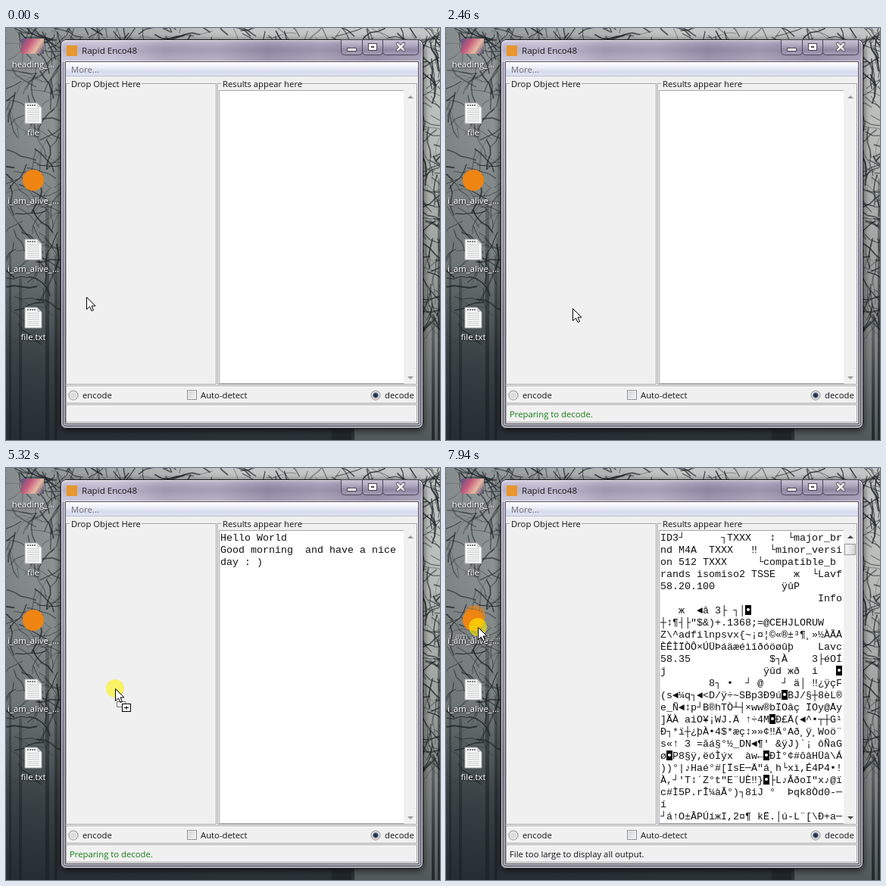
An HTML page with a canvas for the animation above (8000 ms loop, 573 by 544 pixels).

```html
<!DOCTYPE html>
<html lang="en">
<head>
<meta charset="utf-8">
<title>Decoder demo</title>
<style>
html, body { margin: 0; height: 100%; overflow: hidden; background: #555; }
canvas { display: block; }
</style>
</head>
<body>
<canvas id="stage" width="573" height="544"></canvas>
<script>
const W = 573, H = 544, LOOP = 8000;
const UI = '"Open Sans", "Noto Sans", sans-serif';
const MONO = '13.33px "Liberation Mono", "DejaVu Sans Mono", monospace';
const view = document.getElementById('stage').getContext('2d');
const backdrop = document.createElement('canvas');
backdrop.width = W;
backdrop.height = H;
let g = backdrop.getContext('2d');

let seed = 11;
const rnd = () => (seed = seed * 16807 % 2147483647) / 2147483647;

function fill(x, y, w, h, color) {
  g.fillStyle = color;
  g.fillRect(x, y, w, h);
}
function frame(x, y, w, h, color) {
  g.strokeStyle = color;
  g.lineWidth = 1;
  g.strokeRect(x + .5, y + .5, w - 1, h - 1);
}
function etch(x, y, w, h) {
  frame(x + 1, y + 1, w, h, '#fff');
  frame(x, y, w, h, '#a0a0a0');
}
function shade(x0, y0, x1, y1, ...colors) {
  const s = g.createLinearGradient(x0, y0, x1, y1);
  colors.forEach((c, i) => s.addColorStop(i / (colors.length - 1), c));
  return s;
}
function text(s, x, y, color = '#111', size = 11.3) {
  g.font = `${size}px ${UI}`;
  g.fillStyle = color;
  g.fillText(s, x, y);
}
function disc(x, y, r, color) {
  g.fillStyle = color;
  g.beginPath();
  g.arc(x, y, r, 0, 7);
  g.fill();
}
function poly(points, color, line) {
  g.beginPath();
  points.forEach(([x, y]) => g.lineTo(x, y));
  g.closePath();
  g.fillStyle = color;
  g.fill();
  if (line) {
    g.strokeStyle = line;
    g.lineWidth = 1;
    g.stroke();
  }
}

function forest() {
  fill(0, 0, W, H, shade(0, 0, 0, H, '#c3c7c5', '#b9bdba', '#a4a8a5', '#838886', '#50585a'));
  fill(0, 0, 300, H, shade(0, 0, 300, 0, 'rgba(35,45,52,.38)', 'rgba(35,45,52,0)'));
  fill(0, 310, 460, 234, shade(0, 310, 0, H, 'rgba(38,46,52,0)', 'rgba(38,46,52,.6)', 'rgba(34,41,46,.85)'));
  g.lineCap = 'round';
  for (let i = 0; i < 420; i++) {
    let x = i % 3 ? (i % 3 == 1 ? rnd() * 80 : 545 + rnd() * 30) : rnd() * W;
    let y = i % 3 ? rnd() * 400 : rnd() * 30, a = rnd() * 7;
    g.strokeStyle = `rgba(28,34,38,${.35 + rnd() * .45})`;
    g.lineWidth = .5 + rnd() * 1.5;
    g.beginPath();
    g.moveTo(x, y);
    for (let k = 0; k < 4; k++) {
      a += rnd() - .5;
      x += Math.cos(a) * 10;
      y += Math.sin(a) * 10;
      g.lineTo(x, y);
    }
    g.stroke();
  }
  for (const [x, w, top] of [[4, 3, 300], [17, 4, 330], [52, 5, 230], [64, 4, 300], [430, 26, 520], [562, 4, 380], [570, 5, 200]])
    fill(x, top, w, H - top, shade(0, top, 0, H, 'rgba(32,38,42,.3)', 'rgba(30,35,39,.9)'));
}

function captionButtons() {
  for (const [x, w] of [[442, 29], [470, 28], [497, 48]]) {
    g.beginPath();
    g.roundRect(x + .5, 15.5, w - 1, 20, [0, 0, 4, 4]);
    g.fillStyle = shade(0, 15, 0, 36, '#cbc6d6', '#b3adc2', '#8f88a2', '#a9a2ba');
    g.fill();
    g.strokeStyle = '#4b475a';
    g.lineWidth = 1;
    g.stroke();
  }
  fill(450, 26, 13, 5, '#484552');
  fill(451, 27, 11, 3, '#fff');
  fill(478, 20, 12, 10, '#484552');
  fill(479, 21, 10, 8, '#fff');
  fill(482, 24, 4, 2, '#484552');
  for (const [color, width] of [['#484552', 4.5], ['#fff', 2.5]]) {
    g.strokeStyle = color;
    g.lineWidth = width;
    g.beginPath();
    g.moveTo(517, 21);
    g.lineTo(525, 29);
    g.moveTo(525, 21);
    g.lineTo(517, 29);
    g.stroke();
  }
}

function groupBox(x, w, title, titleWidth) {
  etch(x, 73, w, 398);
  fill(x + 5, 72, titleWidth, 4, '#f0f0f0');
  text(title, x + 7, 78);
}

function radio(x, on) {
  disc(x, 485, 6.5, '#8e8f8f');
  disc(x, 485, 5.5, '#f4f4f4');
  disc(x, 485, 4.3, on ? '#8a97a6' : '#dcdcdc');
  if (on) disc(x, 485, 2.8, '#1d3044');
}

function appWindow() {
  g.save();
  g.shadowColor = 'rgba(0,0,0,.75)';
  g.shadowBlur = 10;
  g.shadowOffsetY = 2;
  g.beginPath();
  g.roundRect(72, 15, 479, 514, 7);
  g.fillStyle = shade(0, 15, 0, 529, '#a8a0b9', '#a19bb0', '#928ca2', '#767385', '#83828f');
  g.fill();
  g.restore();
  g.save();
  g.clip();
  fill(72, 15, 479, 30, shade(72, 0, 551, 0, '#c8c4d8', '#cbc7da', '#aaa3ba', '#b3abc2', '#978ea9', '#a89fb8', '#9188a3', '#a79eb7'));
  fill(72, 15, 479, 30, shade(0, 15, 0, 45, 'rgba(255,255,255,.3)', 'rgba(80,65,105,.12)', 'rgba(255,255,255,.1)'));
  g.restore();
  for (const [inset, color] of [[.5, '#1d1c22'], [1.5, 'rgba(255,255,255,.65)']]) {
    g.beginPath();
    g.roundRect(72 + inset, 15 + inset, 479 - 2 * inset, 514 - 2 * inset, 6.5);
    g.strokeStyle = color;
    g.lineWidth = 1;
    g.stroke();
  }
  fill(80, 23, 14, 14, '#e8962e');
  text('Rapid Enco48', 100, 34, '#1a1a1a', 11.6);
  captionButtons();

  frame(77, 43, 469, 481, 'rgba(255,255,255,.5)');
  frame(78, 44, 467, 479, '#55525f');
  fill(79, 45, 465, 477, '#f0f0f0');
  fill(79, 45, 465, 19, shade(0, 45, 0, 64, '#fff', '#eef1f9', '#d6dcee', '#dfe4f3'));
  fill(79, 63, 465, 1, '#b9bfd3');
  text('More...', 86, 59, '#6d6d6d');
  groupBox(79, 199, 'Drop Object Here', 95);
  groupBox(279, 264, 'Results appear here', 105);
  fill(281, 82, 245, 388, '#fff');
  frame(281, 82, 245, 388, '#a3a6ac');
  fill(525, 82, 17, 388, '#f0f0f0');
  etch(79, 472, 464, 24);
  etch(79, 497, 464, 24);
  radio(89, false);
  radio(488, true);
  text('encode', 101, 489);
  text('Auto-detect', 257, 489);
  text('decode', 500, 489);
  fill(239, 478, 13, 13, '#f4f4f4');
  fill(241, 480, 9, 9, shade(241, 480, 250, 489, '#cfd2d6', '#f4f4f4'));
  frame(239, 478, 13, 13, '#8e8f8f');
}

const icons = [
  ['thumb', 'heading_...', 22], ['page', 'file', 112], ['ball', 'i_am_alive_...', 202],
  ['page', 'i_am_alive_...', 292], ['page', 'file.txt', 382]
];
function drawIcon([kind, label, y]) {
  if (kind == 'thumb') {
    fill(20, 14, 30, 20, shade(20, 14, 50, 34, '#54557f', '#c4587c', '#e7b8a3', '#3f426c'));
  } else if (kind == 'ball') {
    disc(36, y - 1, 14, '#ee8512');
  } else {
    poly([[25, y - 13], [41, y - 13], [47, y - 7], [47, y + 14], [25, y + 14]], '#fafafa', '#aaa');
    poly([[41, y - 13], [41, y - 7], [47, y - 7]], '#ccd0d2');
    for (let k = 0; k < 7; k++) fill(28, y - 6 + k * 2.7, 16, 1, '#c2c5c6');
    for (let k = 0; k < 4; k++) fill(28 + k * 3, y - 11, 2, 2, '#777');
  }
  g.save();
  g.textAlign = 'center';
  g.shadowColor = '#000';
  g.shadowBlur = 3;
  g.shadowOffsetX = g.shadowOffsetY = 1;
  text(label, 36, y + 30, '#fff');
  g.restore();
}

const greeting = ['Hello World', 'Good morning  and have a nice', 'day : )'];
const binary = String.raw`ID3┘      ┐TXXX   ↕  └major_br
nd M4A  TXXX   ‼  └minor_versi
on 512 TXXX     └compatible_b
rands isomiso2 TSSE   ж  └Lavf
58.20.100           ÿûP
                          Info
   ж  ◄â 3├ ┐│◘
┼↕¶┤├"$&)+.1368;=@CEHJLORUW
Z\^adfilnpsvx{~¡¤¦©«®±³¶¸»½ÀÃÅ
ÈÊÌÏÒÔ×ÚÜÞáäæéìîðóöøûþ    Lavc
58.35             $┐À    3├éOÍ
j                ÿûd жð  i   ◘
        8┐ •  ┘ @   ┘ ä│ ‼¿ÿçF
(s◄¼q┐◄<D/ÿ÷~SBp3Ð9ú◘BJ/§┼8èL®
e_Ñ◄↕p┘B®hTÒ┴┤×ww®bÏOâç ÏOy@Åy
]ÃÀ aiO¥¡WJ.Ä ↑÷4M◘Ð£Ä(◄^•┬┼G¹
Ð┐*ï┼¿þÀ•4$*æç↕»»¢‼Ä°Að¸ÿ¸Woö¨
s«↑ 3 =ãá§°½_DN◄¶' &ÿJ)` + '`' + String.raw`¡ ôÑaG
ø◘P8§ÿ,ëóÌýx  àw←◘ÐÌ°¢#õâHÜâ\Á
))°|♪Haé°#[ÏsE─Ä"á¸h└xì,É4P4•!
À,┘'T↕´Z°t"E¨UÈ‼}◘├L♪ÂðoI"x♪@ï
c#Ì5P.rÎ¼àÂ°)┐8iJ °  Þqk8Òd0-─
í
┘á↑O±ÂPÚíжI,2¤¶ kË.│ú-L¨[\Ð+a─`;
const dump = binary.split('\n');

function results(lines) {
  g.save();
  g.beginPath();
  g.rect(282, 83, 243, 386);
  g.clip();
  g.font = MONO;
  g.fillStyle = '#111';
  lines.forEach((line, row) => [...line].forEach((ch, col) => {
    const x = 283 + col * 8, y = 96 + row * 16;
    if (ch == '◘') {
      fill(x, y - 11, 8, 13, '#000');
      disc(x + 4, y - 5, 2, '#fff');
      g.fillStyle = '#111';
    } else g.fillText(ch, x, y);
  }));
  g.restore();
}

function scrollbar(active) {
  const color = active ? '#444' : '#9a9a9a';
  poly([[530, 93], [538, 93], [534, 89]], color);
  poly([[530, 460], [538, 460], [534, 464]], color);
  if (!active) return;
  fill(527, 101, 14, 14, shade(527, 0, 541, 0, '#f6f6f6', '#e6e6e6', '#cfcfcf'));
  frame(526, 100, 15, 15, '#979797');
}

// Pointer moves: start, end, number of steps, then the points passed
const moves = [
  [230, 850, 9, [106, 355], [25, 384]],
  [1390, 2000, 9, [25, 384], [82, 359], [158, 363]],
  [2130, 2230, 2, [158, 363], [167, 370]],
  [3390, 4150, 10, [167, 370], [32, 298]],
  [4380, 4480, 2, [32, 298], [31, 290]],
  [4560, 5090, 8, [31, 290], [58, 272], [112, 277]],
  [5190, 5320, 3, [112, 277], [144, 291]],
  [5400, 5650, 4, [144, 291], [151, 299]],
  [6350, 6580, 3, [151, 299], [131, 277]],
  [6650, 7130, 8, [131, 277], [22, 212]],
  [7200, 7340, 3, [22, 212], [46, 224], [40, 216]],
  [7740, 7940, 3, [40, 216], [42, 210]]
];
// Drags: press, release, icon index, grab point
const drags = [[1310, 2460, 4, [25, 384]], [4380, 5880, 3, [32, 298]], [7740, LOOP, 2, [40, 216]]];

function pointerAt(t) {
  const move = moves.findLast(m => t >= m[0]);
  if (!move) return moves[0][3];
  const [start, end, steps, ...pts] = move;
  const step = Math.min(steps, Math.floor((t - start) / (end - start) * (steps - 1) + 1e-6) + 1);
  const p = step / steps * (pts.length - 1), i = Math.min(Math.floor(p), pts.length - 2);
  return pts[i].map((v, k) => Math.round(v + (pts[i + 1][k] - v) * (p - i)));
}

function pointer(x, y, pressed, copying) {
  if (pressed) disc(x, y, 12, 'rgba(255,243,0,.58)');
  g.save();
  g.translate(x + .5, y + .5);
  poly([[0, 0], [0, 16], [4, 12.5], [6.5, 18], [9, 17], [6.5, 11.5], [11.5, 11.5]], '#fff', '#000');
  g.restore();
  if (!copying) return;
  g.setLineDash([1, 1]);
  frame(x + 2, y + 17, 12, 8, '#000');
  g.setLineDash([]);
  fill(x + 9, y + 20, 12, 11, '#fff');
  frame(x + 9, y + 20, 12, 11, '#000');
  fill(x + 12, y + 25, 6, 1, '#000');
  fill(x + 14.5, y + 23, 1, 5, '#000');
}

function status(t) {
  const entered = (from, to) => t >= from && t < to && pointerAt(t)[0] > 78;
  if (entered(1310, 2460) || t >= 2460 && t < 2760 || entered(4480, 5880))
    text('Preparing to decode.', 84, 514, '#157a15');
  else if (t >= 5880) text('File too large to display all output.', 84, 514);
  else if (t >= 2760) text('Done', 84, 514, '#2b3a2b');
}

function draw(t) {
  g.drawImage(backdrop, 0, 0);
  const [x, y] = pointerAt(t);
  const drag = drags.find(d => t >= d[0] && t < d[1]);
  const moved = drag && (x != drag[3][0] || y != drag[3][1]);
  const outside = x < 72;
  for (const icon of icons) {
    const top = icon[2] - 19;
    if (outside && !moved && y >= top && y < top + 54) {
      fill(0, top, 71, 54, shade(0, top, 0, top + 54, 'rgba(190,210,230,.25)', 'rgba(140,180,220,.5)'));
      frame(-1, top, 72, 54, 'rgba(190,215,240,.6)');
      fill(0, top + 53, 71, 1, '#86b4e2');
    }
    drawIcon(icon);
  }
  if (t >= 5880) results(dump);
  else if (t >= 2760) results(greeting);
  scrollbar(t >= 5880);
  status(t);
  if (moved && outside) {
    g.save();
    g.globalAlpha = .6;
    g.translate(x - drag[3][0], y - drag[3][1]);
    drawIcon(icons[drag[2]]);
    g.restore();
  }
  pointer(x, y, drag, moved && !outside);
}

forest();
appWindow();
g = view;
const begin = performance.now();
function tick() {
  draw((performance.now() - begin) % LOOP);
  requestAnimationFrame(tick);
}
tick();
</script>
</body>
</html>
```
